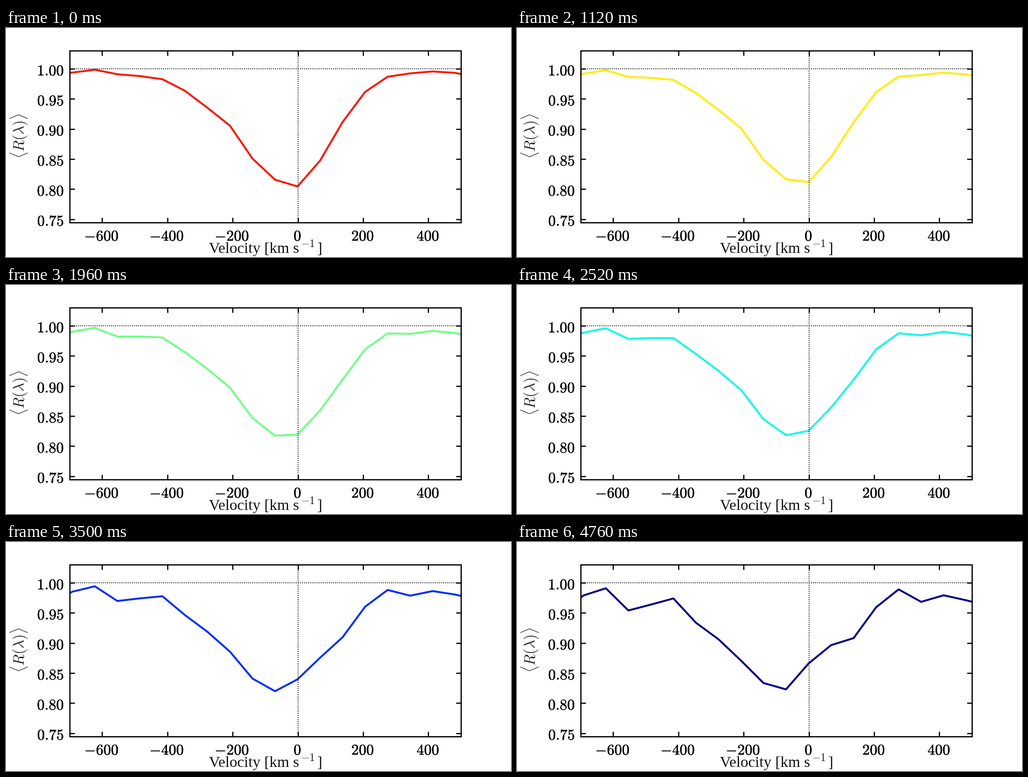
Recreate the animation shown at these times as a matplotlib script. Size 1110 by 505 pixels, loop 4.9 s.

```python
import matplotlib
import matplotlib.pyplot as plt
import numpy as np
from matplotlib.animation import FuncAnimation
from matplotlib.patches import Rectangle
from matplotlib.patheffects import withStroke

W, H, DPI = 1110, 505, 100
PX = 72 / DPI  # points per pixel
FRAMES, INTERVAL = 35, 140
LEFT, RIGHT, TOP, BOTTOM = 139.5, 1000, 50, 428.5
ZERO_X, UNIT_Y = 641.5, 90

plt.rcParams["mathtext.fontset"] = "cm"

fig = plt.figure(figsize=(W / DPI, H / DPI), dpi=DPI, facecolor="white")
ax = fig.add_axes([0, 0, 1, 1])
ax.set_xlim(0, W)
ax.set_ylim(H, 0)
ax.axis("off")


def label(x, y, text, size, bold=0.0, **kw):
    t = ax.text(x, y, text, fontsize=size * PX, **kw)
    if bold:
        t.set_path_effects([withStroke(linewidth=bold * PX, foreground="black")])
    return t


def segment(x0, y0, x1, y1, width=2.6, **kw):
    ax.plot([x0, x1], [y0, y1], color="black", lw=width * PX,
            solid_capstyle="butt", dash_capstyle="butt", **kw)


# Axes frame, ticks and tick labels
ax.add_patch(Rectangle((LEFT, TOP), RIGHT - LEFT, BOTTOM - TOP, fill=False,
                       ec="black", lw=2.7 * PX, zorder=5))
for v in range(-600, 401, 200):
    x = ZERO_X + 0.7168 * v
    segment(x, TOP, x, TOP + 11, zorder=5)
    segment(x, BOTTOM, x, BOTTOM - 11, zorder=5)
    label(x - (1.5 if v < 0 else 0.8), 469, f"${v}$", 33, 0.5,
          ha="center", va="baseline")
for i in range(6):
    y = UNIT_Y + 66.3 * i
    segment(LEFT, y, LEFT + 11.5, y, zorder=5)
    segment(RIGHT, y, RIGHT - 11.5, y, zorder=5)
    label(127.5, y + 14.5, f"${1 - 0.05 * i:.2f}$", 33, 0.5,
          ha="right", va="baseline")

# Dotted guides
dots = dict(width=1.9, linestyle=(0, (1, 1.4)), zorder=4)
segment(LEFT, UNIT_Y, RIGHT, UNIT_Y, **dots)
segment(ZERO_X, BOTTOM, ZERO_X, TOP, **dots)

# Axis titles
serif = dict(family="Liberation Serif", va="baseline", color="#111111")
label(446, 496, "Velocity [km s", 34, ha="left", **serif)
label(663.5, 483, "$-1$", 24, ha="center", va="baseline", color="#111111")
label(689, 496, "]", 34, ha="center", **serif)
label(29, 238, r"$\langle R(\lambda)\rangle$", 33, ha="center", va="center",
      rotation=90, color="#222222")

# Line profile: each vertex moves from its start height to its end height
knots = 145.8 + 49.5 * np.arange(18)
xs = np.concatenate([[136], knots, [1004]])
start = np.array([99.8, 98.3, 92, 102, 106, 113, 138.5, 176, 215.5, 288, 334.5,
                  349.5, 292.5, 207.5, 141, 107.5, 100, 95.8, 99, 102.3])
end = np.array([127, 118, 102, 151, 138, 124.5, 178, 214.5, 261.5, 311, 325,
                268, 227.5, 212, 144, 104.5, 132, 117.5, 128.5, 132.8])
GROWTH = 0.0455
jet = matplotlib.colormaps["jet"]

curve, = ax.plot(xs, start, lw=4.2 * PX, solid_joinstyle="round", zorder=3)
curve.set_clip_path(Rectangle((LEFT, TOP), RIGHT - LEFT, BOTTOM - TOP,
                              transform=ax.transData))


def update(i):
    part = np.expm1(GROWTH * i) / np.expm1(GROWTH * (FRAMES - 1))
    curve.set_ydata(start + (end - start) * part)
    curve.set_color(jet(max(0.0, 0.888 - 0.0288 * i)))
    return curve,


anim = FuncAnimation(fig, update, frames=FRAMES, interval=INTERVAL,
                     repeat=True, repeat_delay=0, blit=False)
plt.show()
```
